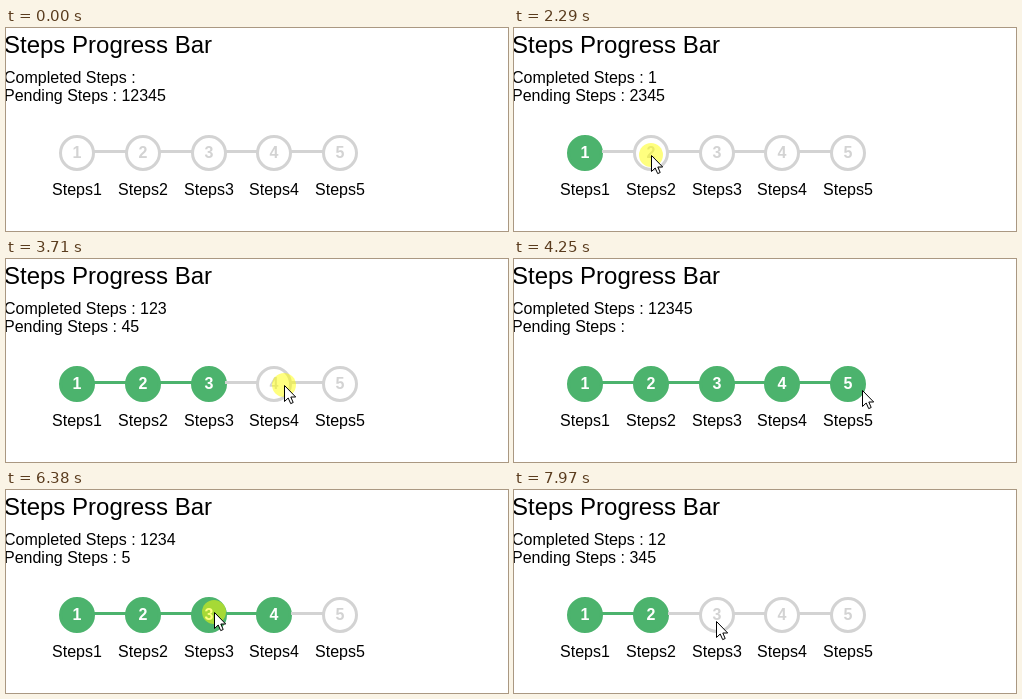
An HTML page for the animation above (8000 ms loop, 502 by 203 pixels).

```html
<!DOCTYPE html>
<html lang="en">
<head>
<meta charset="utf-8">
<title>Steps Progress Bar</title>
<style>
html, body { margin: 0; width: 100%; height: 100%; overflow: hidden; background: #fff; }
svg { display: block; font: 16px "Liberation Sans", Arial, sans-serif; }
.title { font-size: 24px; }
.link { stroke: #d3d3d3; stroke-width: 3; }
circle { fill: #fff; stroke: #d3d3d3; stroke-width: 3; }
#steps text { text-anchor: middle; }
.num { fill: #d3d3d3; font-weight: bold; }
.done .link { stroke: #4cb36d; }
.done circle { fill: #4cb36d; stroke: #4cb36d; }
.done .num { fill: #fff; }
#glow { fill: #ff0; fill-opacity: .5; stroke: none; }
</style>
</head>
<body>
<svg width="502" height="203" viewBox="0 0 502 203">
  <text class="title" x="-2" y="25">Steps Progress Bar</text>
  <text id="completed" x="-2" y="55"></text>
  <text id="pending" x="-2" y="73"></text>
  <g id="steps"></g>
  <g id="pointer">
    <circle id="glow" r="12"/>
    <path d="M.5 .5V16.5L4.2 13 6.7 18.6 9.2 17.5 6.8 12H11.7Z" fill="#fff" stroke="#000"/>
  </g>
</svg>
<script>
const LOOP = 8000, PRESS = 130, SETTLE = 230;
const $ = id => document.getElementById(id);

// Pointer stops; a stop with a step is a click released at that time
const stops = [
  { time: 1680, x: 78, y: 126, step: 1 },
  { time: 2420, x: 137, y: 127, step: 2 },
  { time: 2960, x: 214, y: 125, step: 3 },
  { time: 3780, x: 278, y: 126, step: 4 },
  { time: 4250, x: 348, y: 131, step: 5 },
  { time: 4660, x: 309, y: 182 },
  { time: 5270, x: 286, y: 137 },
  { time: 5820, x: 269, y: 125, step: 4 },
  { time: 6450, x: 208, y: 122, step: 3 },
  { time: 7200, x: 140, y: 123, step: 2 },
  { time: 7400, x: 102, y: 127 },
  { time: 7970, x: 202, y: 131 }
];
const clicks = stops.filter(s => s.step);

const steps = [1, 2, 3, 4, 5].map(n => {
  const x = Math.round(71 + (n - 1) * 65.8);
  const g = document.createElementNS("http://www.w3.org/2000/svg", "g");
  const link = n > 1 ? `<path class="link" d="M${x - 49} 123.5H${x - 17}"/>` : "";
  g.innerHTML = `${link}<circle cx="${x}" cy="125" r="16.5"/>
    <text class="num" x="${x}" y="130">${n}</text>
    <text x="${x}" y="167">Steps${n}</text>`;
  $("steps").append(g);
  return g;
});

const smooth = p => p * p * (3 - 2 * p);

// Longer moves take longer, but none starts before the previous stop is over
function pointerAt(t) {
  let from = { time: 0, x: 352, y: 208 };
  for (const to of stops) {
    const dx = to.x - from.x, dy = to.y - from.y;
    const end = to.time - (to.step ? SETTLE : 0);
    const start = Math.max(from.time, end - 120 - 3.3 * Math.hypot(dx, dy));
    if (t < end) {
      const p = smooth(Math.max(0, (t - start) / (end - start)));
      return [from.x + dx * p, from.y + dy * p];
    }
    from = to;
  }
  return [from.x, from.y];
}

function draw(now) {
  const t = now % LOOP;
  const done = clicks.reduce((n, c) => t >= c.time ? c.step : n, 0);
  const pressed = clicks.some(c => t >= c.time - PRESS && t < c.time);
  steps.forEach((g, i) => g.classList.toggle("done", i < done));
  $("completed").textContent = "Completed Steps : " + "12345".slice(0, done);
  $("pending").textContent = "Pending Steps : " + "12345".slice(done);
  const [x, y] = pointerAt(t).map(Math.round);
  $("pointer").setAttribute("transform", `translate(${x} ${y})`);
  $("glow").style.display = pressed ? "" : "none";
  requestAnimationFrame(draw);
}
draw(0);
</script>
</body>
</html>
```
